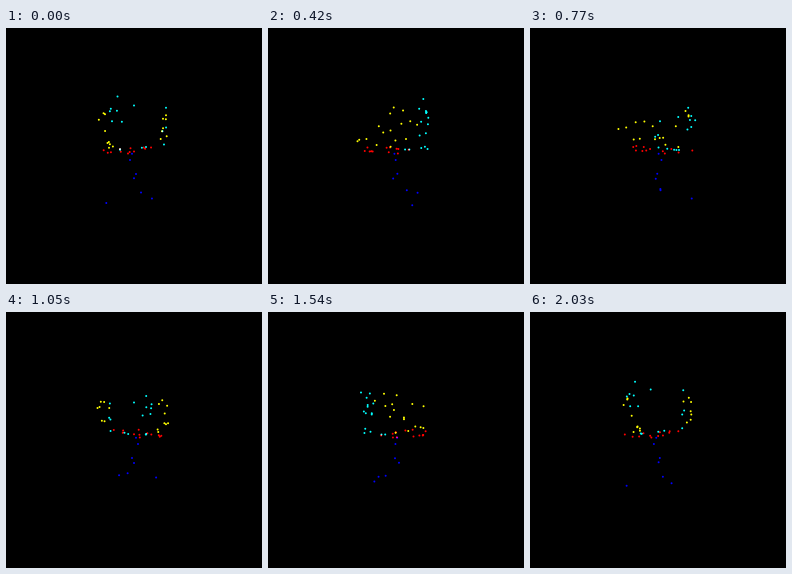
An HTML page with a canvas for the animation above (2100 ms loop, 256x256 px).

```html
<!DOCTYPE html>
<html lang="en">
<head>
<meta charset="utf-8">
<title>Turning chair of dots</title>
<style>
html, body { margin: 0; width: 100%; height: 100%; overflow: hidden; background: #000; }
canvas { display: block; }
</style>
</head>
<body>
<canvas id="stage" width="256" height="256"></canvas>
<script>
const ctx = document.getElementById("stage").getContext("2d");

const STEP = 70, STEPS = 30;
const CENTER = 128, CAMERA = 200, RADIUS = 1;

// Each part: colour and its points as x, y (down), z (towards the viewer).
const parts = [
  { color: "#00f", points: [
    [-4, 4, 1], [2, 18, 0.8], [0, 22.6, -3], [6.7, 34.8, 9.4],
    [16.3, 38.5, 18.5], [-24.6, 41.8, 22.5], [-2, -2.3, -1]
  ] },
  { color: "#f00", points: [
    [18.5, -9.2, -17], [-4, -8.8, -29.5], [10.3, -9, -10], [11.2, -7.3, -1],
    [-13.7, -6.8, 5], [-27.3, -5.2, 20], [-26, -3.2, 1.8], [-25, -4, -17],
    [-15, -4.8, -27], [-5.9, -2.5, 3.8], [-4.8, -4.6, -23.3], [0, -5, -27]
  ] },
  { color: "#ff0", points: [
    [-29.3, -41.2, 7.5], [-26.8, -38.7, 15], [-34.1, -35.2, 6], [-29.8, -25.8, -6],
    [-24.6, -8.2, 3], [-22.3, -10, -11.3], [-27.5, -15.2, -19], [-29.8, -14.6, -25],
    [-27.5, -13.5, -28], [30.9, -39.4, 7], [26.7, -34.4, 15.8], [32.5, -37.5, -4],
    [31.5, -30.1, -17], [31.7, -27.9, -26.3], [28, -17.8, -9.8], [32.4, -19.5, 1.6]
  ] },
  { color: "#0ff", points: [
    [-14, -50.5, 30], [0, -43, 30], [27.5, -41.6, 28], [-20, -40.7, 27.5],
    [-14.3, -38, 32.5], [-20, -37.2, 34], [-18.8, -29.7, 29], [-10.1, -28.6, 33.5],
    [28, -25, 25.3], [25.8, -22.4, 18.8], [26.3, -10, 24.5], [6.7, -7, 30.5],
    [10.6, -8, 23.5], [-13, -6, 13], [-12.8, -6, 17]
  ] }
];

function drawDot([x, y, z], cos, sin) {
  const scale = CAMERA / (CAMERA - (z * cos - x * sin));
  const px = CENTER + (x * cos + z * sin) * scale;
  const py = CENTER + y * scale;
  ctx.beginPath();
  ctx.arc(px, py, RADIUS, 0, 2 * Math.PI);
  ctx.fill();
}

function draw(step) {
  const angle = 2 * Math.PI * step / STEPS;
  const cos = Math.cos(angle), sin = Math.sin(angle);
  ctx.globalCompositeOperation = "source-over";
  ctx.fillStyle = "#000";
  ctx.fillRect(0, 0, 256, 256);
  // Overlapping colours add up to white.
  ctx.globalCompositeOperation = "lighter";
  for (const { color, points } of parts) {
    ctx.fillStyle = color;
    for (const point of points) drawDot(point, cos, sin);
  }
}

const start = performance.now();

function tick() {
  draw(Math.floor((performance.now() - start) / STEP) % STEPS);
  requestAnimationFrame(tick);
}
tick();
</script>
</body>
</html>
```
